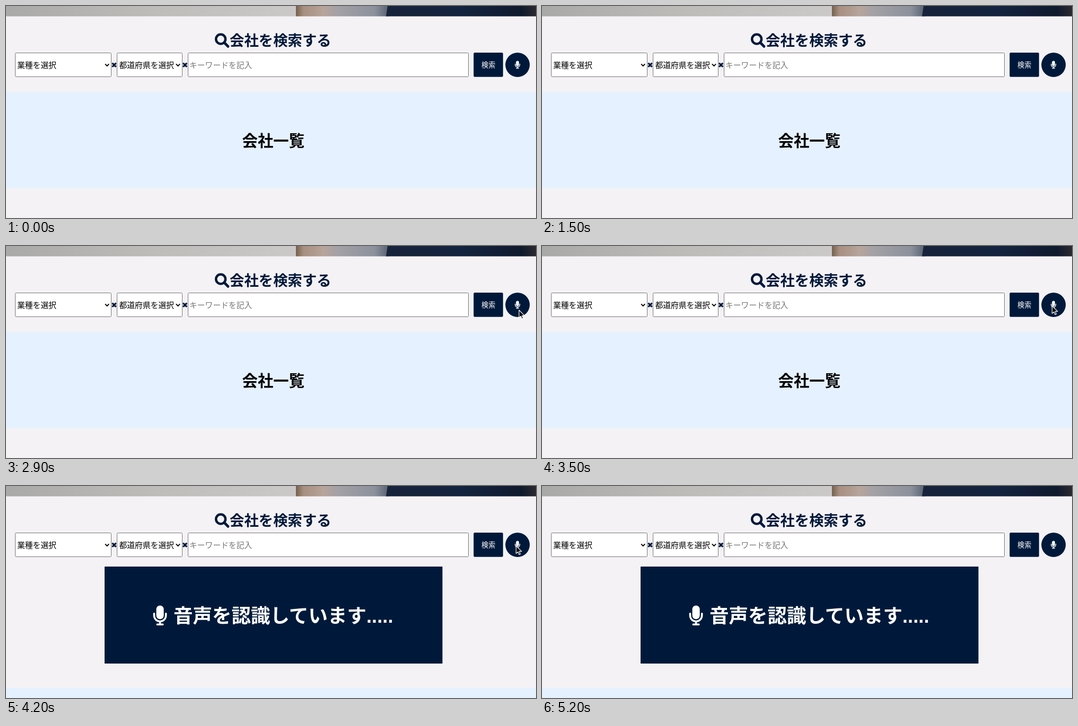
Recreate the animation shown at these times as an HTML page. Size 1000 by 400 pixels, loop 5.4 s.

```html
<!DOCTYPE html>
<html lang="ja">
<head>
<meta charset="utf-8">
<title>会社を検索する</title>
<style>
  html, body { margin: 0; width: 100%; height: 100%; overflow: hidden; background: #f4f2f5; }
  svg { display: block; width: 1000px; height: 400px; }
  text { font-family: "Noto Sans CJK JP", "Noto Sans CJK", sans-serif; font-size: 14.8px; white-space: pre; }
  .bold { font-weight: 700; }
  .dots { font-family: "Liberation Sans", sans-serif; }
  .field { fill: #fff; stroke: #767676; }
  .navy { fill: #00193a; }
  .cross { stroke: #00193a; stroke-width: 3.2; }
  .chevron { fill: none; stroke: #000; stroke-width: 1.9; }

  .list, .panel, .cursor { animation: 5400ms step-end infinite; }
  .list { animation-name: push; }
  .panel { animation-name: show; }
  .cursor { animation-name: move; }

  @keyframes push {
    0% { transform: translateY(0); }
    68.518%, 100% { transform: translateY(219px); }
  }
  @keyframes show {
    0% { opacity: 0; }
    68.518%, 100% { opacity: 1; }
  }
  /* In from the right edge, rest on the microphone, leave across the panel */
  @keyframes move {
    0% { transform: translate(-60px, -60px); }
    51.851% { transform: translate(988px, 143px); }
    53.703% { transform: translate(968px, 121px); }
    55.555% { transform: translate(962.5px, 113px); }
    85.185% { transform: translate(931px, 141px); }
    87.037% { transform: translate(822px, 231px); }
    88.888% { transform: translate(700.5px, 308px); }
    90.740% { transform: translate(590px, 348px); }
    92.592% { transform: translate(479px, 358px); }
    94.444%, 100% { transform: translate(-60px, -60px); }
  }
</style>
</head>
<body>
<svg viewBox="0 0 1000 400">
  <defs>
    <linearGradient id="wall">
      <stop offset="0" stop-color="#a9a9a8"/>
      <stop offset=".5" stop-color="#bebcb9"/>
      <stop offset="1" stop-color="#cac9c8"/>
    </linearGradient>
    <linearGradient id="arm">
      <stop offset="0" stop-color="#75604f"/>
      <stop offset=".08" stop-color="#a78f80"/>
      <stop offset=".3" stop-color="#b7a49b"/>
      <stop offset=".45" stop-color="#a3a1a6"/>
      <stop offset=".85" stop-color="#8c919c"/>
      <stop offset="1" stop-color="#596273"/>
    </linearGradient>
    <linearGradient id="cloth">
      <stop offset="0" stop-color="#17233a"/>
      <stop offset=".5" stop-color="#14233f"/>
      <stop offset=".9" stop-color="#101a2e"/>
      <stop offset="1" stop-color="#2b2a2e"/>
    </linearGradient>
    <g id="mic">
      <rect x="80" width="192" height="352" rx="96" fill="#fff"/>
      <path d="M24 208v48a152 152 0 0 0 304 0v-48M176 408v80M104 488h144"
            fill="none" stroke="#fff" stroke-width="48" stroke-linecap="round"/>
    </g>
    <path id="cross" class="cross" d="M-3.6-3.6 3.6 3.6M3.6-3.6-3.6 3.6"/>
    <path id="chevron" class="chevron" d="M-3.6-1.9 0 1.8 3.6-1.9"/>
  </defs>

  <rect width="1000" height="400" fill="#f4f2f5"/>

  <rect width="549" height="19.5" fill="url(#wall)"/>
  <rect x="547" width="175" height="19.5" fill="url(#arm)"/>
  <path d="M720 0H1000V19.5H717Z" fill="url(#cloth)"/>

  <g transform="translate(394 51.3) scale(.0537)" fill="none" stroke="#00193a">
    <circle cx="208" cy="208" r="166" stroke-width="84"/>
    <path d="M330 330 464 464" stroke-width="92" stroke-linecap="round"/>
  </g>
  <text class="bold navy" x="422" y="75.4" style="font-size:27.4px">会社を検索する</text>

  <rect class="field" x="17.5" y="88.5" width="181" height="45" rx="2"/>
  <text x="21" y="116.5">業種を選択</text>
  <use href="#chevron" x="190.7" y="111.3"/>
  <use href="#cross" x="204" y="111.3"/>

  <rect class="field" x="209.5" y="88.5" width="123" height="45" rx="2"/>
  <text x="213.5" y="116.5">都道府県を選択</text>
  <use href="#chevron" x="324.5" y="111.3"/>
  <use href="#cross" x="337.7" y="111.3"/>

  <rect class="field" x="343.5" y="88.5" width="529" height="45" rx="2"/>
  <text x="346" y="116.5" fill="#757575">キーワードを記入</text>

  <rect class="navy" x="882.3" y="88" width="55.5" height="45.7" rx="2"/>
  <text x="897" y="115.8" fill="#fff" style="font-size:13.2px">検索</text>

  <circle class="navy" cx="965.2" cy="111" r="23"/>
  <use href="#mic" transform="translate(960 103.5) scale(.0288)"/>

  <g class="list">
    <rect y="162" width="1000" height="182" fill="#e5f1ff"/>
    <text class="bold" x="445.5" y="265" style="font-size:29.4px">会社一覧</text>
  </g>

  <g class="panel">
    <rect class="navy" x="186" y="152" width="637.5" height="183"/>
    <use href="#mic" transform="translate(277.7 225.5) scale(.0733)"/>
    <text class="bold" x="316" y="257.8" fill="#fff" style="font-size:36.5px">音声を認識しています<tspan class="dots">.....</tspan></text>
  </g>

  <path class="cursor" d="M0 0V14.4L3.4 11.3 5.6 16.4 8 15.4 5.8 10.4H10.3Z"
        fill="#000" stroke="#fff" stroke-width="1.2" stroke-linejoin="round"/>
</svg>
</body>
</html>
```
